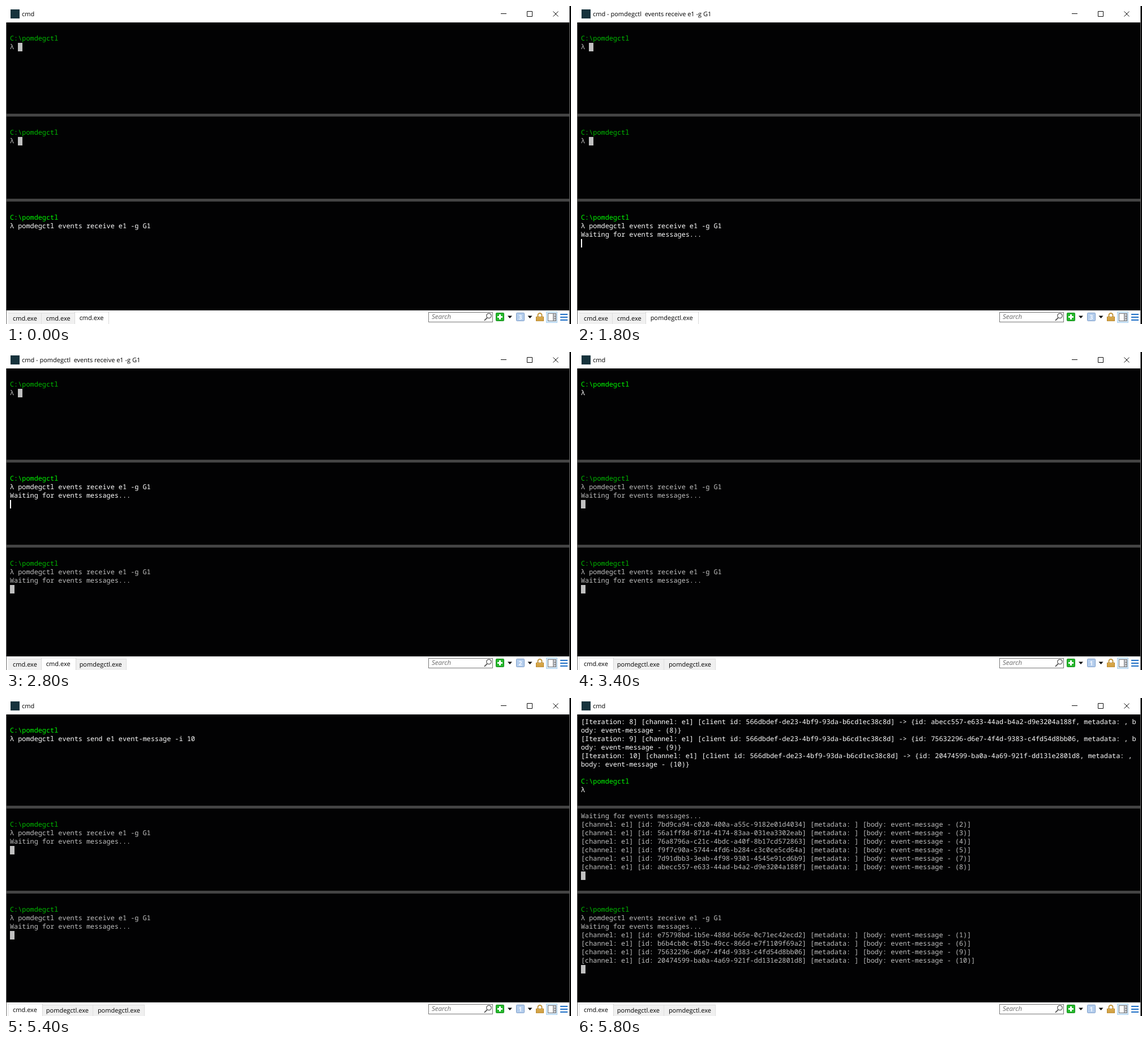
These frames come from a looping animation (998 by 561 pixels, 6200 ms). An HTML page:

```html
<!DOCTYPE html>
<html lang="en">
<head>
<meta charset="utf-8">
<title>Terminal</title>
<style>
  html, body { margin: 0; width: 100%; height: 100%; overflow: hidden; background: #020203; }
  #stage {
    position: absolute; left: 0; top: 0; width: 998px; height: 561px; overflow: hidden;
    font: 11px "Open Sans", "Noto Sans", sans-serif; color: #000;
    text-rendering: geometricPrecision; white-space: pre;
  }
  #stage > * { position: absolute; }
  #bar { left: 0; top: 0; width: 995px; height: 29px; background: #fff; }
  #title { left: 28px; top: 0; line-height: 29px; }
  #foot { left: 0; top: 537px; width: 995px; height: 24px; background: #fff; }
  .edge { top: 0; width: 1px; height: 561px; background: #6e6e6e; }
  .split { left: 1px; width: 994px; height: 5px; background: #444; }

  .pane {
    left: 7px; width: 988px; color: #c0c0c0;
    font: 500 11.85px/15px "Noto Sans Mono", "DejaVu Sans Mono", monospace;
  }
  .pane div { height: 15px; }
  .pane .dir { color: #00bc00; }
  .pane.on { color: #fff; }
  .pane.on .dir { color: #00fa00; }
  .pane i { position: absolute; width: 8px; height: 15px; background: #c0c0c0; }
  .pane.on i { width: 2px; background: #fff; }

  #tabs { left: 4px; top: 541px; display: flex; }
  .tab {
    position: relative; box-sizing: border-box; height: 20px; padding: 0 8px;
    line-height: 22px; background: #f0f0f0; box-shadow: inset -1px 1px #dedede;
  }
  .tab span { position: relative; }
  .tab.on { z-index: 1; }
  .tab.on::before {
    content: ""; position: absolute; left: -1px; right: -2px; top: -2px; bottom: 0;
    background: #fff; box-shadow: inset 1px 1px #d9d9d9, inset -1px 0 #d9d9d9;
  }
  .tab.on span { top: -1px; }
  #search { left: 752px; top: 539px; font-size: 11.5px; line-height: 20px; font-style: italic; color: #6b6b6b; }
</style>
</head>
<body>
<div id="stage">
  <div id="bar"></div>
  <div id="title"></div>
  <div class="split" style="top:190px"></div>
  <div class="split" style="top:340px"></div>
  <div class="pane" style="top:35px"></div>
  <div class="pane" style="top:201px"></div>
  <div class="pane" style="top:351px"></div>
  <div id="foot"></div>
  <div id="tabs"></div>
  <svg width="998" height="561" style="left:0;top:0" fill="none">
    <rect x="8" y="6" width="16" height="16" fill="#17333d"/>
    <g stroke="#111">
      <path d="M874 13.5h10M920.5 9.5h9v9h-9z"/>
      <path d="M966.5 9.5l9 9m0-9l-9 9"/>
    </g>
    <rect x="746.5" y="540.5" width="113" height="17" fill="#fff" stroke="#777"/>
    <g stroke="#555" stroke-width="1.3">
      <circle cx="853" cy="546.5" r="4.2"/>
      <path d="M850 549.8l-5 5" stroke-width="1.8"/>
    </g>
    <rect x="865.5" y="541.5" width="14" height="14" rx="1" fill="#25b82c" stroke="#158a1c"/>
    <path d="M872.5 544v9M868 548.5h9" stroke="#fff" stroke-width="3"/>
    <path d="M886 546.5h8l-4 4.5zM921.5 546.5h8l-4 4.5z" fill="#111"/>
    <rect x="901.5" y="541.5" width="14" height="14" rx="1" fill="#b4cdec" stroke="#7f9fca"/>
    <text id="num" x="908.5" y="553" text-anchor="middle" font-size="11" font-weight="700" fill="#f4f8ff"></text>
    <path d="M939.5 549v-3.5a3.5 3.5 0 0 1 7 0v3.5" stroke="#c4973d" stroke-width="2"/>
    <rect x="936.5" y="548.5" width="13" height="7" fill="#e3b455" stroke="#b58328"/>
    <path d="M937 551.5h12M937 553.5h12" stroke="#b58328" stroke-width=".7"/>
    <rect x="954.5" y="539.5" width="19" height="19" fill="#d5e9f9" stroke="#a9d0ef"/>
    <rect x="957.5" y="542.5" width="14" height="13" fill="#fff" stroke="#777"/>
    <path d="M967 543h4v12h-4z" fill="#c4c8ce"/>
    <path d="M966.5 543v12M968 547.5h3M968 551.5h3" stroke="#777"/>
    <path d="M979 544h13M979 549h13M979 554h13" stroke="#1f6fc6" stroke-width="2"/>
  </svg>
  <div id="search">Search</div>
  <div class="edge" style="left:0;top:29px"></div>
  <div class="edge" style="left:995px"></div>
</div>
<script>
const LOOP = 6200, COLS = 138, CELL = 7.11, ROW = 15;
const APP = "pomdegctl", DIR = "C:\\" + APP;
const RECEIVE = APP + " events receive e1 -g G1";
const SEND = APP + " events send e1 event-message -i 10";
const WAIT = "Waiting for events messages...";
const CLIENT = "566dbdef-de23-4bf9-93da-b6cd1ec38c8d";
const IDS = {
  1: "e75798bd-1b5e-488d-b65e-0c71ec42ecd2",
  2: "7bd9ca94-c020-400a-a55c-9182e01d4034",
  3: "56a1ff8d-871d-4174-83aa-031ea3302eab",
  4: "76a8796a-c21c-4bdc-a40f-8b17cd572863",
  5: "f9f7c90a-5744-4fd6-b284-c3c0ce5cd64a",
  6: "b6b4cb0c-015b-49cc-866d-e7f1109f69a2",
  7: "7d91dbb3-3eab-4f98-9301-4545e91cd6b9",
  8: "abecc557-e633-44ad-b4a2-d9e3204a188f",
  9: "75632296-d6e7-4f4d-9383-c4fd54d8bb06",
  10: "20474599-ba0a-4a69-921f-dd131e2801d8"
};

const wrap = s => s.match(new RegExp(`.{1,${COLS}}`, "g"));
const sent = n => wrap(`[Iteration: ${n}] [channel: e1] [client id: ${CLIENT}] -> ` +
  `{id: ${IDS[n]}, metadata: , body: event-message - (${n})}`);
const got = n => `[channel: e1] [id: ${IDS[n]}] [metadata: ] [body: event-message - (${n})]`;

// Each screen is a list of lines; the cursor sits at the end of the last one.
const prompt = (cmd = "") => ["", DIR, "λ " + cmd];
const entered = [...prompt(RECEIVE), ""];
const waiting = [...prompt(RECEIVE), WAIT, ""];
const sender = [...[8, 9, 10].flatMap(sent), ...prompt()];
const second = [WAIT, ...[2, 3, 4, 5, 7, 8].map(got), ""];
const third = [...prompt(RECEIVE), WAIT, ...[1, 6, 9, 10].map(got), ""];

// Start time and what changes; everything else carries over.
const CMD = "cmd.exe", EXE = APP + ".exe";
const BUSY = "cmd - " + APP + "  events receive e1 -g G1";
const steps = [
  [0, { focus: 2, title: "cmd", caret: false, a: prompt(), b: prompt(), c: prompt(RECEIVE), tabs: [CMD, CMD, CMD] }],
  [400, { caret: true }],
  [600, { caret: false }],
  [800, { caret: true }],
  [1200, { title: BUSY, c: entered }],
  [1400, { c: waiting, tabs: [CMD, CMD, EXE] }],
  [1600, { caret: false }],
  [1800, { caret: true }],
  [2000, { focus: 1, title: "cmd", caret: false }],
  [2200, { caret: true }],
  [2400, { b: prompt("clear") }],
  [2600, { b: prompt(RECEIVE) }],
  [2800, { title: BUSY, b: waiting }],
  [3000, { caret: false, tabs: [CMD, EXE, EXE] }],
  [3400, { focus: 0, title: "cmd" }],
  [3600, { caret: true }],
  [4000, { a: prompt("clear") }],
  [4200, { a: prompt(SEND) }],
  [4400, { caret: false }],
  [4600, { caret: true }],
  [5000, { caret: false }],
  [5200, { caret: true }],
  [5400, { caret: false }],
  [5600, { caret: true, a: sender, b: second, c: third }],
  [5800, { caret: false }]
];
const states = [];
steps.forEach(([, change], i) => states.push({ ...states[i - 1], ...change }));

const $ = id => document.getElementById(id);
const panes = [...document.querySelectorAll(".pane")];
function make(tag, cls, text = "") {
  const el = document.createElement(tag);
  el.className = cls;
  el.textContent = text;
  return el;
}

function drawPane(el, lines, active, caret) {
  el.classList.toggle("on", active);
  el.replaceChildren(...lines.map(s => make("div", s === DIR ? "dir" : "", s)));
  if (active && !caret) return;
  const cursor = make("i", "");
  cursor.style.left = Math.round(lines.at(-1).length * CELL) + "px";
  cursor.style.top = (lines.length - 1) * ROW + "px";
  el.append(cursor);
}

function draw(s) {
  [s.a, s.b, s.c].forEach((lines, i) => drawPane(panes[i], lines, i === s.focus, s.caret));
  $("title").textContent = s.title;
  $("num").textContent = s.focus + 1;
  $("tabs").replaceChildren(...s.tabs.map((name, i) => {
    const tab = make("div", i === s.focus ? "tab on" : "tab");
    tab.append(make("span", "", name));
    return tab;
  }));
}

const start = performance.now();
let shown = -1;
function tick() {
  const t = (performance.now() - start) % LOOP;
  const now = steps.findLastIndex(([at]) => at <= t);
  if (now !== shown) draw(states[shown = now]);
  requestAnimationFrame(tick);
}
tick();
</script>
</body>
</html>
```
